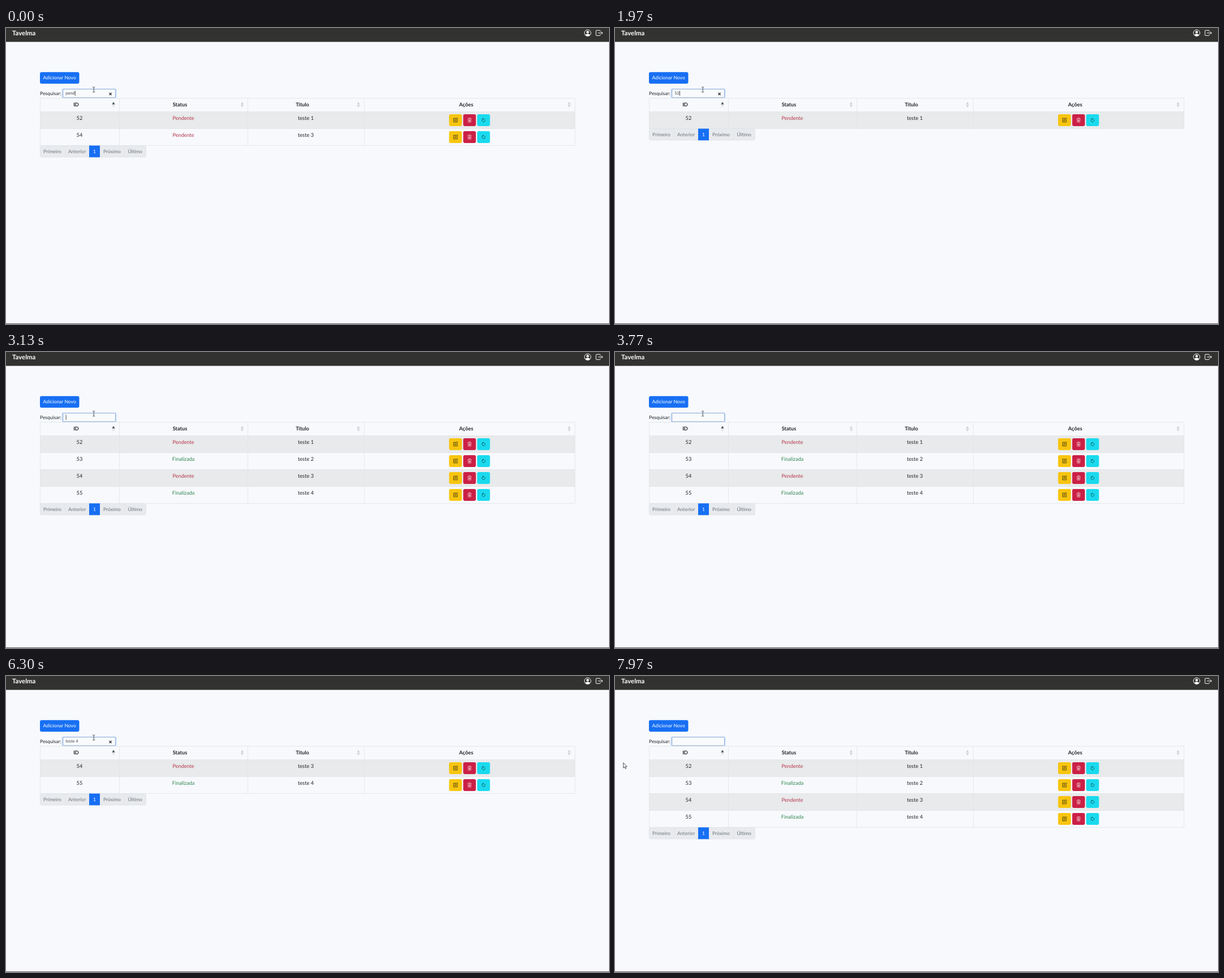
These frames come from a looping animation (1066x525 px, 8000 ms). An HTML page with a canvas:

```html
<!DOCTYPE html>
<html lang="pt-BR">
<head>
<meta charset="utf-8">
<title>Tarefas</title>
<style>
html, body { margin: 0; width: 100%; height: 100%; overflow: hidden; background: #f7f9fc; }
canvas { display: block; width: 1066px; height: 525px; }
</style>
</head>
<body>
<canvas id="stage"></canvas>
<script>
const W = 1066, H = 525, LOOP = 8000;
const canvas = document.getElementById('stage');
const ctx = canvas.getContext('2d');
const ratio = window.devicePixelRatio || 1;
canvas.width = W * ratio;
canvas.height = H * ratio;

const INK = '#212529', PAGE = '#f7f9fc', BLUE = '#176ff3', LINE = '#e1e4e6';
const TABLE = { left: 60, right: 1006, top: 124.5, body: 148.5, rowH: 30 };

const rows = [52, 53, 54, 55].map((id, i) => ({
  id: String(id),
  status: i % 2 ? 'Finalizada' : 'Pendente',
  title: 'teste ' + (i + 1)
}));

const columns = [
  { name: 'ID', x: 124, sort: 190 },
  { name: 'Status', x: 307.5, sort: 417.5 },
  { name: 'Título', x: 524, sort: 623 },
  { name: 'Ações', x: 813.5, sort: 995.5 }
];

const pages = [
  ['Primeiro', 82], ['Anterior', 125.7], ['1', 156.5], ['Próximo', 187.5], ['Último', 228.2]
];

// Key strokes as [time, search text]
const keys = [[-200, 'pend']];
function type(word, start, step) {
  for (let i = 1; i <= word.length; i++) keys.push([start + (i - 1) * step, word.slice(0, i)]);
}
function erase(word, start, step) {
  for (let i = 1; i <= word.length; i++) keys.push([start + (i - 1) * step, word.slice(0, -i)]);
}
erase('pend', 350, 80);
type('52', 1720, 130);
erase('52', 2880, 120);
type('teste 4', 4390, 140);
keys[keys.length - 2][0] = 5480;
keys[keys.length - 1][0] = 5700;
erase('teste 4', 6330, 20);

function box(x, y, w, h, r, fill, stroke, line = 1) {
  ctx.beginPath();
  ctx.roundRect(x, y, w, h, r);
  if (fill) { ctx.fillStyle = fill; ctx.fill(); }
  if (stroke) { ctx.strokeStyle = stroke; ctx.lineWidth = line; ctx.stroke(); }
}

function text(str, x, base, size, color, align = 'center', weight = 400) {
  ctx.font = `${weight} ${size}px Lato, "Open Sans", sans-serif`;
  ctx.textAlign = align;
  ctx.fillStyle = color;
  ctx.fillText(str, x, base);
}

function path(d, color, line, x = 0, y = 0, scale = 1) {
  ctx.save();
  ctx.translate(x, y);
  ctx.scale(scale, scale);
  const p = new Path2D(d);
  if (line) {
    ctx.strokeStyle = color;
    ctx.lineWidth = line;
    ctx.stroke(p);
  } else {
    ctx.fillStyle = color;
    ctx.fill(p);
  }
  ctx.restore();
}

function drawHeader() {
  ctx.fillStyle = '#323230';
  ctx.fillRect(0, 0, W, 24.6);
  text('Tavelma', 11, 13.4, 11.4, '#fff', 'left', 700);
  ctx.save();
  ctx.beginPath();
  ctx.arc(1028.3, 8.8, 5.7, 0, 7);
  ctx.strokeStyle = '#fff';
  ctx.lineWidth = 1;
  ctx.stroke();
  ctx.clip();
  ctx.fillStyle = '#fff';
  ctx.beginPath();
  ctx.arc(1028.3, 7.2, 2.3, 0, 7);
  ctx.ellipse(1028.3, 14, 4.7, 3.7, 0, 0, 7);
  ctx.fill();
  ctx.restore();
  path('M1050.5 6.4V5.2Q1050.5 4.2 1049.5 4.2H1044Q1043 4.2 1043 5.2V12.4Q1043 13.4 1044 13.4H1049.5Q1050.5 13.4 1050.5 12.4V11.2M1046.5 8.8H1054.6M1052.3 6.4L1054.7 8.8L1052.3 11.2', '#fff', 1);
}

function drawSearch(value, caret) {
  box(60, 78.3, 69.5, 20.5, 3, BLUE);
  text('Adicionar Novo', 94.7, 91.2, 8.6, '#fff');
  text('Pesquisar:', 60, 118.5, 8.5, INK, 'left');
  box(98.8, 107.5, 96.4, 17, 2, '#bdd5f7');
  box(100.8, 108.6, 92.6, 14.8, 1, '#f9fafc', '#87a9d5', 0.8);
  text(value, 105.3, 118.3, 7.3, '#444', 'left');
  if (caret) {
    const x = 105.3 + ctx.measureText(value).width + 0.4;
    ctx.fillStyle = '#222';
    ctx.fillRect(x, 111.5, 0.8, 8.6);
  }
  if (value) path('M182.6 115L186.6 119M186.6 115L182.6 119', '#2b3036', 1.3);
}

function drawSort(x, active) {
  path('M-2.7 -.4L0 -5L2.7 -.4Z', active ? '#50545a' : '#d1d4d9', 0, x, 136);
  path('M-2.7 .4L0 5L2.7 .4Z', active ? '#dfe1e5' : '#d1d4d9', 0, x, 136);
}

function drawActions(y) {
  box(783.3, y, 22.6, 21, 2.8, '#f8c50f');
  box(808.3, y, 22.4, 21, 2.8, '#cb2046');
  box(833, y, 22.6, 21, 2.8, '#1adaee');
  const cy = y + 10.4;
  path('M.9 -3.1H-3.3V3.5H3.1V-.3M-1.2 1.2L-.8 -.6L2.7 -4L4 -2.7L.6 .8Z', '#24210c', 0.8, 794.7, cy);
  path('M-3.4 -2.6H3.4M-1.2 -2.8V-3.9H1.2V-2.8M-2.7 -2.3L-2.4 3.8H2.4L2.7 -2.3M-1 -1V2.6M0 -1V2.6M1 -1V2.6', '#f6dbe1', 0.65, 819.5, cy);
  ctx.beginPath();
  ctx.arc(844.2, cy + 0.3, 2.7, -1.1, 4.1);
  ctx.strokeStyle = '#123b42';
  ctx.lineWidth = 0.75;
  ctx.stroke();
  path('M-.2 -3.9L-2.3 -2.4L-.2 -.9Z', '#123b42', 0, 844.3, cy);
}

function drawTable(found) {
  const { left, right, top, body, rowH } = TABLE;
  const bottom = body + found.length * rowH;
  found.forEach((row, i) => {
    const y = body + i * rowH;
    if (i % 2 === 0) {
      ctx.fillStyle = '#e8eaeb';
      ctx.fillRect(left, y, right - left, rowH);
    }
    const base = y + 14.2;
    text(row.id, 130, base, 9.3, INK);
    text(row.status, 313.6, base, 9.1, row.status === 'Pendente' ? '#b5344b' : '#2f8550');
    text(row.title, 530, base, 9.3, INK);
    drawActions(y + 4.4);
  });

  ctx.fillStyle = LINE;
  for (const x of [left, 200, 427, 633, right - 0.5]) ctx.fillRect(x, top, 0.8, bottom - top);
  for (let y = top; y <= bottom; y += y === top ? body - top : rowH) {
    ctx.fillRect(left, y - 0.4, right - left, 0.8);
  }
  columns.forEach((col, i) => {
    text(col.name, col.x, 138.9, 9.2, INK, 'center', 700);
    drawSort(col.sort, i === 0);
  });
  drawPages(bottom);
}

function drawPages(y) {
  box(60.4, y + 0.2, 187, 20.4, 3, '#e8eaed', '#dee1e5', 0.7);
  ctx.fillStyle = '#dfe2e6';
  for (const x of [104, 209.2]) ctx.fillRect(x, y, 0.6, 20.6);
  ctx.fillStyle = BLUE;
  ctx.fillRect(147, y, 19, 20.8);
  for (const [name, x] of pages) text(name, x, y + 13.2, 8.6, name === '1' ? '#fff' : '#6c757d');
}

function drawPointer(t) {
  const p = Math.min(1, Math.max(0, (t - 7530) / 370));
  const k = p * p * (3 - 2 * p);
  const x = 155.2 - 140.4 * k, y = 109.3 + 44.5 * k;
  if (x > 99 && y < 124.5) {
    path('M-2 -4.5H-.5L0 -4L.5 -4.5H2M0 -4V4M-2 4.5H-.5L0 4L.5 4.5H2', '#26282c', 0.8, x, y);
  } else {
    const arrow = 'M0 0V9.4L2.1 7.4L3.5 10.7L5 10L3.6 6.9H6.4Z';
    path(arrow, '#fff', 0, x, y);
    path(arrow, '#222', 0.8, x, y);
  }
}

function search(value) {
  const words = value.split(' ').filter(Boolean);
  return rows.filter(row => {
    const all = Object.values(row).join(' ').toLowerCase();
    return words.every(word => all.includes(word));
  });
}

function draw(t) {
  ctx.setTransform(ratio, 0, 0, ratio, 0, 0);
  ctx.textRendering = 'geometricPrecision';
  ctx.fillStyle = PAGE;
  ctx.fillRect(0, 0, W, H);
  const [pressed, value] = keys.filter(key => key[0] <= t).pop();
  drawHeader();
  drawSearch(value, (t - pressed) % 1000 < 500);
  drawTable(search(value));
  ctx.fillStyle = '#55575a';
  ctx.fillRect(0, 524, W, 1);
  drawPointer(t);
}

const start = performance.now();
function tick() {
  draw((performance.now() - start) % LOOP);
  requestAnimationFrame(tick);
}
tick();
</script>
</body>
</html>
```
